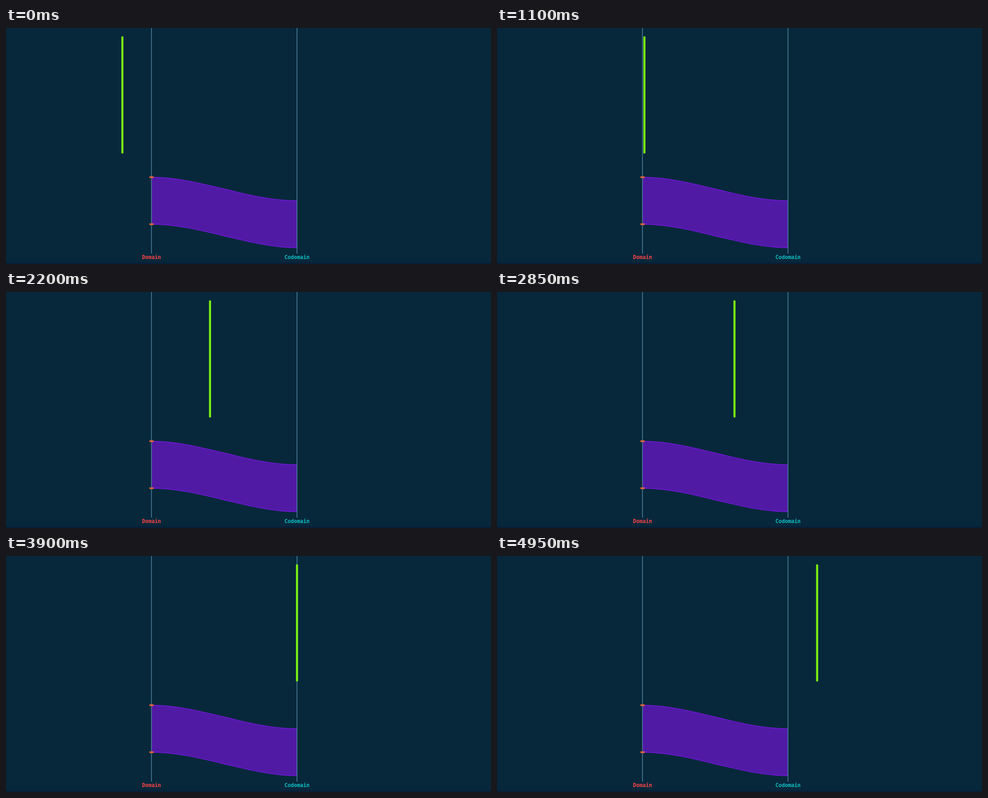
Write an HTML page that moves like this. It is 1074 px wide and 522 px high and loops after 5 s.

```html
<!DOCTYPE html>
<html lang="en">
<head>
<meta charset="utf-8">
<title>Domain and codomain</title>
<style>
  html, body { margin: 0; width: 100%; height: 100%; overflow: hidden; background: #07283b; }
  svg { display: block; }
  text { font: bold 11.6px "DejaVu Sans Mono", monospace; text-anchor: middle; }
  .band { fill: #511aa5; }
  .edge { fill: none; stroke: #7716e0; stroke-width: 1.3; }
  .axis { stroke: #588cae; stroke-width: 1.4; }
  .tick { stroke: #e5653a; stroke-width: 4; stroke-linecap: round; opacity: .93; }
  .bar { stroke: #7cef12; stroke-width: 4.6; stroke-linecap: round; }
</style>
</head>
<body>
<svg width="1074" height="522" viewBox="0 0 1074 522">
  <rect y="518" width="1074" height="4" fill="#071f38"/>
  <path class="band" d="M322.2 330C429.6 330 537 382 644.4 382V486C537 486 429.6 434 322.2 434Z"/>
  <path class="edge" d="M322.2 330C429.6 330 537 382 644.4 382M322.2 434C429.6 434 537 486 644.4 486"/>
  <path class="axis" d="M322.2 0V499M644.4 0V499"/>
  <path class="tick" d="M319.2 330H325.4M319.2 434H325.4"/>
  <text x="322.2" y="510.7" fill="#fb4346">Domain</text>
  <text x="644.4" y="510.7" fill="#0fbfc4">Codomain</text>
  <path class="bar" id="bar" d="M0 20.5V275.5"/>
</svg>
<script>
  const LOOP = 5000, STEP = 50;
  // [time, x]: the bar pauses at each axis
  const stops = [[5, 257.7], [705, 322.2], [1063, 322.2], [3890, 644.4], [4237, 644.4], [4937, 708.9]];
  const bar = document.getElementById("bar");

  function barX(t) {
    const i = stops.findIndex(([time]) => t < time);
    if (i === 0) return stops[0][1];
    if (i < 0) return stops[stops.length - 1][1];
    const [t0, x0] = stops[i - 1], [t1, x1] = stops[i];
    return x0 + (x1 - x0) * (t - t0) / (t1 - t0);
  }

  const start = performance.now();
  function draw() {
    const t = (performance.now() - start) % LOOP;
    bar.setAttribute("transform", `translate(${barX(Math.floor(t / STEP) * STEP)})`);
    requestAnimationFrame(draw);
  }
  draw();
</script>
</body>
</html>
```
